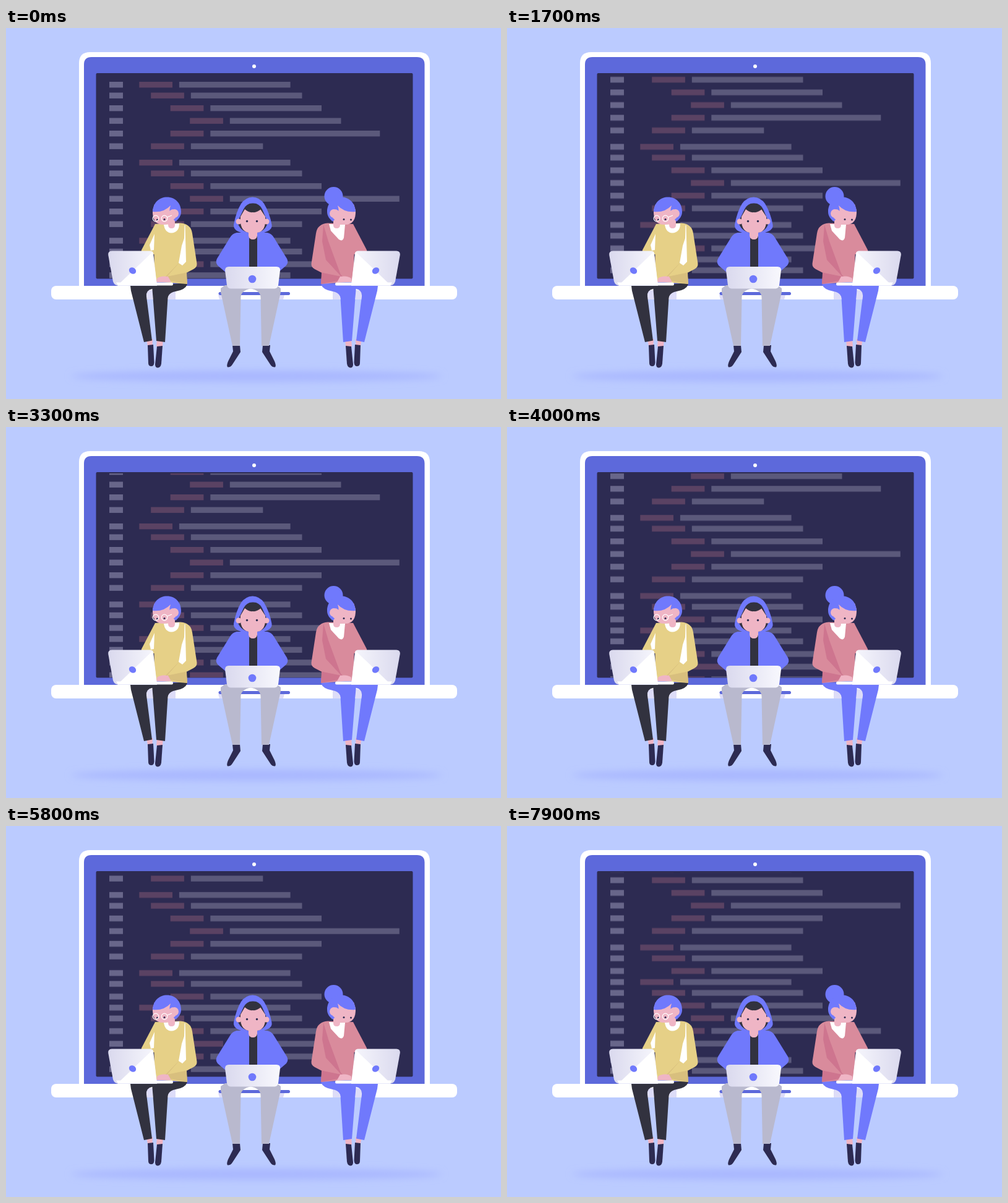
An HTML page for the animation above (8 s loop, 800 px wide and 600 px high).

```html
<!DOCTYPE html>
<html lang="en">
<head>
<meta charset="utf-8">
<title>Coders</title>
<style>
  html, body { margin: 0; width: 100%; height: 100%; overflow: hidden; background: #bbcbff; }
  svg { display: block; width: 100vw; height: 100vh; }
  #code { animation: scroll 8s infinite; }
  @keyframes scroll {
    0%, 6.25% { transform: translateY(0); animation-timing-function: steps(75, start); }
    100% { transform: translateY(-147.5px); }
  }
  .purple { fill: #7079fc; }
  .skin { fill: #efb5c5; }
  .navy { fill: #2d2b52; }
  .white { fill: #fff; }
  .number { fill: #68668a; }
  .keyword { fill: #5a4263; }
  .text { fill: #5b597b; }
  .left { --top: #e6d087; --shade: #d8bf7e; --legs: #32323f; }
  .right { --top: #d98b9c; --shade: #ce758f; --legs: #7079fc; }
  .top { fill: var(--top); }
  .shade { fill: var(--shade); }
  .legs { fill: var(--legs); }
</style>
</head>
<body>
<svg viewBox="0 0 800 600">
  <defs>
    <linearGradient id="lid">
      <stop offset="0" stop-color="#dad9ee"/>
      <stop offset="1" stop-color="#f8f8fd"/>
    </linearGradient>
    <filter id="soft" x="-10%" y="-100%" width="120%" height="300%">
      <feGaussianBlur stdDeviation="6"/>
    </filter>
    <clipPath id="screen"><path d="M146 75H657V405H146Z"/></clipPath>

    <g id="legs">
      <path fill="#dddcf8" d="M226 424H237V439H228ZM263 424H274V439H262Z"/>
      <path class="skin" d="M227 503H237L236.500 514H229ZM244 503H254L253 515H243Z"/>
      <path class="legs" d="M201 417H250L236 422Q226 424 227 434L236 505.500 223 508 202 425Z"/>
      <path class="legs" d="M236 417 293 412Q293 420 282 424L270 427Q262 430 261.500 437L257 508 243 506Z"/>
      <path class="navy" d="M229 513 238 512 239.500 541Q239 547 235 547 230 547 230 542Z"/>
      <path class="navy" d="M244 515 253 514 251 543Q250 549 245 549.500 241 549 241 544Z"/>
    </g>

    <g id="head">
      <path class="skin" d="M261 300H273V319Q273 324 267.500 324 262 324 262 318Z"/>
      <path class="skin" d="M237 295Q236 318 254 318 272 318 278 305L276 285H240Z"/>
      <path class="purple" d="M237 297C238 281 249 273.500 260 273.500 274 273.500 283 284 283 297 283 304 279 309 274 313L267 306Q262 298 266 287 255 299 237 297Z"/>
      <circle class="skin" cx="272" cy="300" r="7"/>
      <path class="skin" d="M262 297 269 293 274 307 262 318Z"/>
      <circle class="navy" cx="244.500" cy="310" r="1.500"/>
      <circle class="navy" cx="256" cy="309.500" r="1.500"/>
    </g>

    <g id="sweater">
      <path class="top" d="M241 317 219 359 218 366 240 366 250 335Z"/>
      <path class="top" d="M241 317 282 315.500Q299 317 301 332L308.500 381Q309 387 303 390L291.500 396 293 414 240 410 239 330Z"/>
      <path class="shade" d="M285 374 260 402 292 395.500 293 414 266 409 258 402Z"/>
    </g>

    <g id="laptop">
      <path class="skin" d="M244 405Q250 400 262 402L267 411H243Z"/>
      <path fill="url(#lid)" d="M171 360.500H233Q237 360.500 238 364L244 416.500H181Q175 416 173 410L165.200 367Q164.500 361 171 360.500Z"/>
      <path class="white" d="M237 362 244 416.500H180Z"/>
      <path class="white" d="M178 411.500H268Q270 411.500 270 414T268 416.500H181Z"/>
      <ellipse class="purple" cx="204.500" cy="392.500" rx="6" ry="5" transform="rotate(35 204.500 392.500)"/>
    </g>

    <g id="hoodieSide">
      <path fill="#dddcf8" d="M343 432H353V439H345Z"/>
      <path class="navy" d="M366 513H378L379 524 366 544Q363 549 358 548.500 356 546 359 539L367 523Z"/>
    </g>
    <path id="trouser" fill="#b9b9ce" d="M347 421 354 416H397V421Q380 424 379.500 435L378 514H366L347 427Z"/>
    <path id="sleeve" class="purple" d="M398 331H373Q366 332 362 339L341 373Q338 379 342 384L356 396 360 386H398Z"/>
  </defs>

  <rect width="800" height="600" fill="#bbcbff"/>
  <ellipse cx="405" cy="563" rx="300" ry="9" fill="#a9b7ff" filter="url(#soft)"/>

  <path class="white" d="M118 420V57Q118 39 136 39H667Q685 39 685 57V420Z"/>
  <path fill="#5d69db" d="M126 418V59Q126 47 138 47H664Q676.500 47 676.500 59V418Z"/>
  <circle class="white" cx="401" cy="62" r="3"/>
  <rect class="navy" x="145.500" y="73" width="512" height="332.500" rx="2"/>
  <g clip-path="url(#screen)"><g id="code"></g></g>
  <rect class="white" x="73" y="417" width="656" height="22" rx="8"/>

  <g class="left">
    <use href="#legs"/>
    <use href="#sweater"/>
    <path class="white" d="M240 333 239 359 234 360 232 351ZM288.500 319H289.500L291 378 285 384 279 380 284 352 288 340Z"/>
    <path class="white" d="M255 318 280 316Q280 331 267 331.500 257 331 255 318Z"/>
    <use href="#head"/>
    <g fill="none" stroke="#fff" stroke-width="1.200">
      <circle cx="242" cy="308" r="4.800"/>
      <circle cx="256" cy="308" r="4.800"/>
      <path d="M260.500 306 268 303"/>
    </g>
    <use href="#laptop"/>
  </g>

  <g>
    <use href="#hoodieSide"/>
    <use href="#hoodieSide" transform="matrix(-1 0 0 1 793 0)"/>
    <rect x="343.500" y="427" width="115.500" height="5" rx="2.500" fill="#5d69db"/>
    <use href="#trouser"/>
    <use href="#trouser" transform="matrix(-1 0 0 1 791 0)"/>
    <use href="#sleeve"/>
    <use href="#sleeve" transform="matrix(-1 0 0 1 795 0)"/>
    <path fill="#32323f" d="M393 334H406V388H393Z"/>
    <path class="purple" d="M398.500 273.500Q410 274 417 284 426 299 429.500 318 431 325 422 329L407 335H390L375 329Q367 325 368 318 372 297 380 284 387 274 398.500 273.500Z"/>
    <path fill="#32323f" d="M399 283.500Q409 283 414 293L423 314Q420 328 406 331H392Q378 328 374 314L384 293Q389 283 399 283.500Z"/>
    <circle class="skin" cx="376" cy="313" r="4.500"/>
    <circle class="skin" cx="421" cy="313" r="4.500"/>
    <path class="skin" d="M379 305 386 293Q394 297 399 291 404 297 411 293L419 305Q421 329 406 331V336Q405 342 399 342T392 336V331Q377 328 379 305Z"/>
    <path fill="#32323f" d="M386 293Q392 284 399 284T412 293Q405 299 399 298 392 299 386 293Z"/>
    <circle class="navy" cx="389.500" cy="312.500" r="1.700"/>
    <circle class="navy" cx="405.500" cy="312.500" r="1.700"/>
    <path fill="url(#lid)" d="M360 386H437Q443.500 386 443 392L440 416Q439 421 434 421.500H363Q358 421 357 416L354 392Q354 386 360 386Z"/>
    <circle class="purple" cx="398" cy="406" r="6.300"/>
  </g>

  <g class="right">
    <circle class="purple" cx="529.500" cy="272" r="15"/>
    <g transform="matrix(-1 0 0 1 802 0)">
      <use href="#legs"/>
      <use href="#sweater"/>
      <path class="shade" d="M289 318 281 345 260 402 285 375 291 345Z"/>
      <path class="white" d="M254 318 280 317 277 328 264 342Q258 346 256 339Z"/>
      <use href="#head"/>
      <use href="#laptop"/>
    </g>
  </g>
</svg>
<script>
  const code = document.getElementById('code');
  const indents = [215.3, 234.2, 265.7, 297.2];
  const levels = [0, 1, 2, 3, 2, 1];
  const rowOffsets = [0, 17.5, 38, 58.5, 79, 99.5];
  const normal = 179.700, long = 274, short = 116.500;

  // Each block: top edge, row count, widths that differ from the normal one.
  const blocks = [
    [87, 6, { 4: long, 5: short }],
    [213, 6, { 3: long }],
    [339.3, 3, {}],
    [395.2, 6, { 4: long, 5: short }],
    [521.3, 3, {}]
  ];

  function addBar(kind, x, y, width) {
    const bar = document.createElementNS('http://www.w3.org/2000/svg', 'rect');
    const attributes = { class: kind, x, y, width, height: 9.4 };
    for (const name in attributes) bar.setAttribute(name, attributes[name]);
    code.append(bar);
  }

  for (const [top, count, widths] of blocks) {
    for (let row = 0; row < count; row++) {
      const y = top + rowOffsets[row];
      const x = indents[levels[row]];
      addBar('number', 167, y, 22);
      addBar('keyword', x, y, 53.7);
      addBar('text', x + 64.6, y, widths[row] || normal);
    }
  }
</script>
</body>
</html>
```
